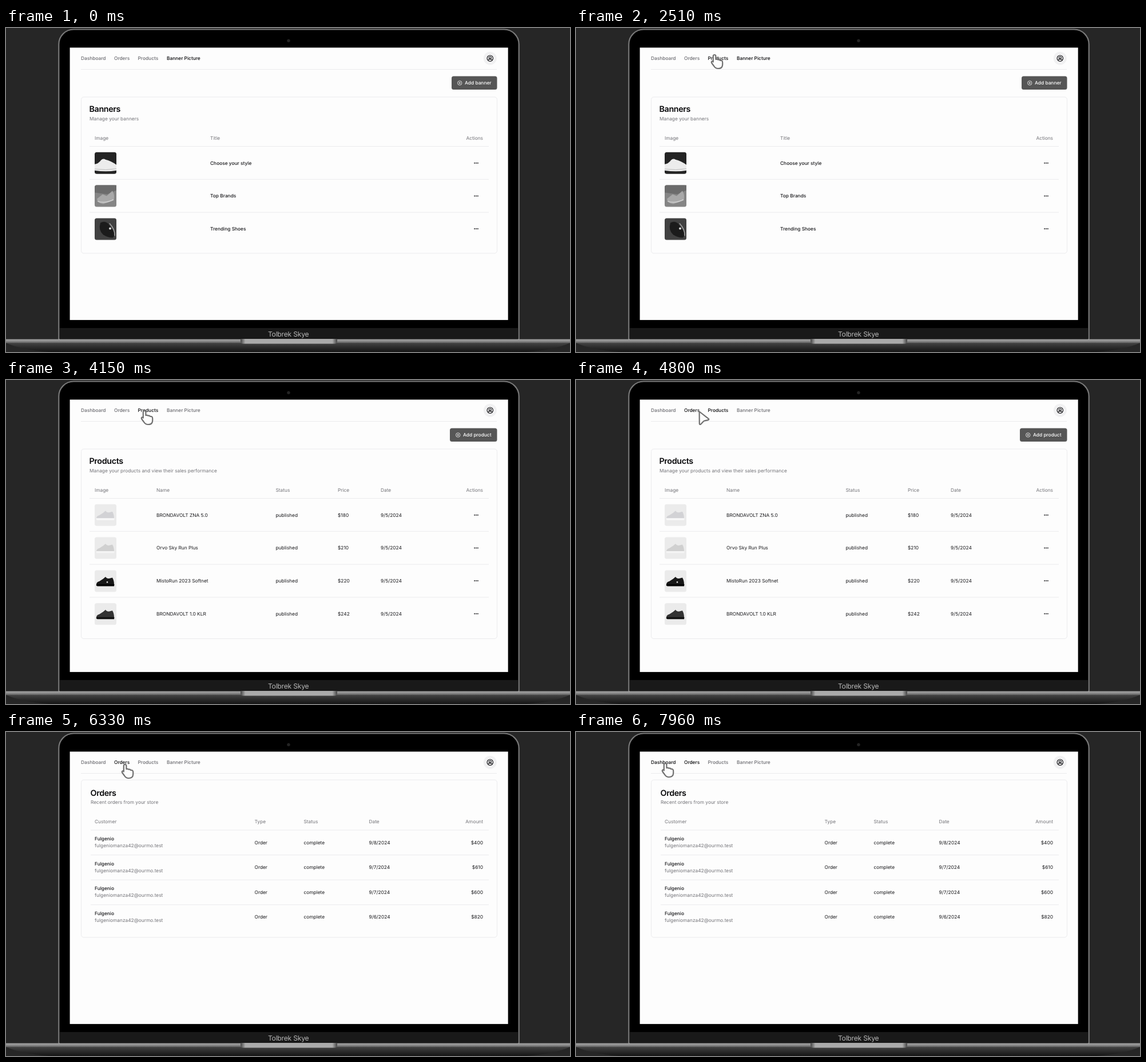
Write an HTML page that moves like this. It is 986 px wide and 568 px high and loops after 8 s.

```html
<!DOCTYPE html>
<html>
<head>
<meta charset="utf-8">
<style>
html, body { margin: 0; width: 100%; height: 100%; overflow: hidden; background: #262626; }
svg { display: block; font: 8.35px Inter, sans-serif; }
text { white-space: pre; text-rendering: geometricPrecision; fill: #18181b; }
.gray { fill: #737378; }
.medium { font-weight: 500; }
.white { fill: #fff; font-weight: 500; }
.title { font-size: 14.3px; font-weight: 600; letter-spacing: -.025em; fill: #09090b; }
.line { fill: none; stroke: #ebebed; }
</style>
</head>
<body>
<svg id="stage" width="986" height="568" viewBox="0 0 986 568"></svg>
<script>
const LOOP = 8000, STEP = 1200 / 11;
const stage = document.getElementById('stage');

const text = (x, y, s, cls = '', anchor = 'start') =>
  `<text x="${x}" y="${y}" class="${cls}" text-anchor="${anchor}">${s}</text>`;
const rect = (x, y, w, h, fill, r = 0) =>
  `<rect x="${x}" y="${y}" width="${w}" height="${h}" rx="${r}" fill="${fill}"/>`;
const circle = (x, y, r, attrs) => `<circle cx="${x}" cy="${y}" r="${r}" ${attrs}/>`;
const path = (d, attrs) => `<path d="${d}" ${attrs}/>`;
const divider = (x, y, end = 844) => path(`M${x} ${y}H${end}`, 'class="line"');
const card = (y, bottom) =>
  `<rect x="131.5" y="${y}" width="727" height="${bottom - y}" rx="4.5" class="line"/>`;
const dots = y => [819.2, 822, 824.8].map(x => circle(x, y, 1, 'fill="#18181b"')).join('');
const heading = (x, y, title, subtitle) =>
  text(x - .5, y, title, 'title') + text(x, y + 14.6, subtitle, 'gray');
const header = (y, cols, last) =>
  cols.map(([x, s]) => text(x, y, s, 'gray')).join('') + text(834, y, last, 'gray', 'end');

function addButton(x, label) {
  return rect(x, 84.5, 858.5 - x, 23.5, '#565656', 3.5) +
    circle(x + 14.2, 96.4, 3.7, 'fill="none" stroke="#fff" stroke-width=".8"') +
    path(`M${x + 12.4} 96.4h3.6m-1.8 -1.8v3.6`, 'stroke="#fff" stroke-width=".8"') +
    text(x + 23, 99.2, label, 'white');
}

const thumb = (y, bg, shapes) =>
  `<g transform="translate(155 ${y})">${rect(0, 0, 38, 38, bg, 3.5)}${shapes}</g>`;
const trainer = (upper, sole) =>
  path('M3 25Q3 20.5 8 19.5L15 15L19 11.5Q21 15 25 14.5L31 13Q34 18 34 25Z', `fill="${upper}"`) +
  path('M3 24.5H34.5L34 28H5Q2 27.5 3 24.5Z', `fill="${sole}"`);

const rowY = i => 236.7 + i * 57.7;

function bannersPage() {
  const rows = ['Choose your style', 'Top Brands', 'Trending Shoes'].map((s, i) =>
    text(357, rowY(i) + 3, s, 'medium') + dots(rowY(i)) + divider(146, 207.5 + i * 57.8));
  const whiteShoe = path('M0 21Q7 20 11 14Q15 10 19 13Q28 15 38 22V32Q20 35 0 32Z', 'fill="#ececec"') +
    path('M0 29.5Q20 32 38 29', 'fill="none" stroke="#bbb"');
  const grayShoe = path('M0 3.5Q0 0 3.5 0H38V9L22 16L0 13Z', 'fill="#6c6c6c"') +
    path('M4 24L14 16L21 19L31 10Q36 18 33 27L15 33Q5 32 4 24Z', 'fill="#a8a8a8"') +
    path('M5 28Q18 33 33 25', 'fill="none" stroke="#d2d2d2" stroke-width="1.5"');
  const darkShoe = path('M10 8Q18 4 24 10L32 21Q37 30 32 34Q25 35 15 29Q6 21 10 8Z', 'fill="#1b1b1b"') +
    path('M26 9Q36 20 35 31', 'fill="none" stroke="#a5a5a5" stroke-width="1.5"') +
    circle(27, 18, 2, 'fill="#ddd"');
  return addButton(779, 'Add banner') + card(121, 395) +
    heading(146, 147.4, 'Banners', 'Manage your banners') +
    header(196, [[155, 'Image'], [357, 'Title']], 'Actions') + rows.join('') +
    thumb(217.8, '#242424', whiteShoe) + thumb(275.6, '#858585', grayShoe) +
    thumb(333.4, '#414141', darkShoe);
}

function productsPage() {
  const items = [
    ['BRONDAVOLT ZNA 5.0', '$180', '#d2d2d5', '#f8f8f8'],
    ['Orvo Sky Run Plus', '$210', '#d0d0d0', '#f4f4f4'],
    ['MistoRun 2023 Softnet', '$220', '#171717', '#050505'],
    ['BRONDAVOLT 1.0 KLR', '$242', '#333', '#111']
  ];
  const rows = items.map(([name, price], i) => {
    const y = rowY(i) + 3;
    return text(263, y, name) + text(471.5, y, 'published') + text(580, y, price) +
      text(655, y, '9/5/2024') + dots(rowY(i)) + divider(146, 207.5 + i * 57.8);
  });
  const pictures = items.map(([, , upper, sole], i) =>
    thumb(217.8 + i * 57.8, '#ebebeb',
      trainer(upper, sole) + (i == 2 ? circle(22, 21, 1.3, 'fill="#ddd"') : '')));
  return addButton(776, 'Add product') + card(121, 453.5) +
    heading(146, 147.4, 'Products', 'Manage your products and view their sales performance') +
    header(196, [[155, 'Image'], [263, 'Name'], [471.5, 'Status'], [580, 'Price'], [655, 'Date']], 'Actions') +
    rows.join('') + `<g id="pictures">${pictures.join('')}</g>`;
}

function ordersPage() {
  const rows = [['8', 400], ['7', 610], ['7', 600], ['6', 820]].map(([day, amount], i) => {
    const y = 196.8 + i * 43.4;
    return text(155, y - 6.5, 'Fulgenio', 'medium') +
      text(155, y + 5.6, 'fulgeniomanza42@ourmo.test', 'gray') +
      text(434.5, y, 'Order') + text(520.5, y, 'complete') +
      text(634.5, y, `9/${day}/2024`) + text(834, y, '$' + amount, '', 'end') +
      divider(148, 172 + i * 43.6);
  });
  return card(84, 360) + heading(148, 111.5, 'Orders', 'Recent orders from your store') +
    header(160, [[155, 'Customer'], [434.5, 'Type'], [520.5, 'Status'], [634.5, 'Date']], 'Amount') +
    rows.join('');
}

const gradient = (id, stops, dir = 'x2="0" y2="1"') => `<linearGradient id="${id}" ${dir}>` +
  stops.map(([at, c]) => `<stop offset="${at}" stop-color="${c}"/>`).join('') + '</linearGradient>';

function laptop() {
  return '<defs>' + gradient('bar', [[0, '#a6a6a6'], [.6, '#858585'], [1, '#5d5d5d']]) +
    gradient('under', [[0, '#444'], [.5, '#2b2b2b'], [1, '#151515']]) +
    gradient('notch', [[0, '#444'], [.05, '#aaa'], [.95, '#aaa'], [1, '#444']], '') + '</defs>' +
    rect(0, 0, 986, 568, '#262626') +
    path('M92.3 546V28.5A26 26 0 0 1 118.3 2.5H870.7A26 26 0 0 1 896.7 28.5V546Z',
      'fill="#000" stroke="#787878" stroke-width="2.2"') +
    rect(94, 526, 801, 20, '#191919') +
    circle(494, 22.3, 2.7, 'fill="#242424"') +
    rect(111.6, 34.4, 766.1, 477.5, '#fdfdfd') + divider(131, 72.5, 858) +
    `<text x="493.7" y="541" text-anchor="middle" style="font-size:12.2px;letter-spacing:-.02em;fill:#b5b5b5">Tolbrek Skye</text>` +
    path('M0 552H986Q960 564 910 568H76Q26 564 0 552Z', 'fill="url(#under)"') +
    rect(0, 545.6, 986, 6.6, 'url(#bar)') +
    path('M410 545H579V549Q579 553.5 574 553.5H415Q410 553.5 410 549Z', 'fill="url(#notch)"');
}

const NAV = [[131, 'Dashboard'], [189, 'Orders'], [230.5, 'Products'], [281, 'Banner Picture']];
const OUTLINE = 'fill="#fdfdfd" stroke="#707070" stroke-width="2.2" stroke-linejoin="round"';

stage.innerHTML = laptop() +
  NAV.map(([x, s]) => text(x, 55.9, s, 'nav medium')).join('') +
  circle(846.3, 53.2, 11.5, 'fill="#f1f1f2"') +
  '<g fill="none" stroke="#18181b" stroke-width="1.2">' + circle(846.3, 53.2, 5.2, '') +
  circle(846.3, 51.9, 1.9, '') + path('M843 57v-.5q0 -1.6 1.6 -1.6h3.4q1.6 0 1.6 1.6v.5', '') + '</g>' +
  [bannersPage(), productsPage(), ordersPage()].map(p => `<g class="page">${p}</g>`).join('') +
  '<g id="cursor">' +
  path('M.8 2.4Q.8 .6 2.3 1.7L16.8 13Q18.4 14.8 16.2 15.3L10.5 16.5Q8.8 17 7.6 18.3L3.6 22.5Q1.2 24.2 1 21.5Z', `id="arrow" ${OUTLINE}`) +
  path('M-2.2 3.5Q-2.2 1 0 1Q2.4 1 2.4 3.5V9Q5 7.8 6.3 9.6Q8.8 8.9 10 10.8Q14.2 10.4 14.2 14.5V18Q14 25 6.5 25Q1.5 25 -1 20.5L-4.7 15.5Q-6 13 -4 12.3Q-2.6 12.1 -2.2 13.5Z', `id="hand" ${OUTLINE}`) +
  '</g>';

// time, x, y of the pointer's tip
const TRACK = [
  [1150, 600, 130], [1420, 541.5, 57.8], [2350, 242, 46], [2900, 242, 46], [3300, 242, 53],
  [4300, 242, 53], [4800, 214.8, 54.8], [5250, 208, 56], [7000, 208, 56], [7700, 156, 54]
];

function pointerAt(t) {
  const i = TRACK.findIndex(k => k[0] > t);
  if (i < 0) return TRACK[TRACK.length - 1].slice(1);
  if (i == 0) return TRACK[0].slice(1);
  const [a, b] = [TRACK[i - 1], TRACK[i]];
  const u = (t - a[0]) / (b[0] - a[0]), e = u * u * (3 - 2 * u);
  return [a[1] + (b[1] - a[1]) * e, a[2] + (b[2] - a[2]) * e];
}

const within = (t, a, b) => t >= a && t < b;
const show = (el, on) => el.setAttribute('visibility', on ? 'inherit' : 'hidden');
const get = id => document.getElementById(id);
const pages = [...stage.querySelectorAll('.page')];
const links = [...stage.querySelectorAll('.nav')];
const cursor = get('cursor'), arrow = get('arrow'), hand = get('hand'), pictures = get('pictures');

function draw(now) {
  const t = Math.floor((now % LOOP + 5) / STEP) * STEP;
  const page = t < 3050 ? 0 : t < 5700 ? 1 : 2;
  const hover = within(t, 2100, 4500) ? 2 : within(t, 4600, 7200) ? 1 : t > 7400 ? 0 : -1;
  const pointing = within(t, 2150, 4450) || within(t, 5000, 7200) || t > 7450;
  pages.forEach((p, i) => show(p, i == page));
  links.forEach((l, i) => l.style.fill = i == 3 - page || i == hover ? '#09090b' : '#6b6b70');
  show(pictures, t > 3900);
  show(arrow, !pointing);
  show(hand, pointing);
  cursor.setAttribute('opacity', Math.max(0, Math.min(1, (t - 1150) / 200)));
  cursor.setAttribute('transform', `translate(${pointerAt(t)})`);
}

const start = performance.now();
(function tick() {
  draw(performance.now() - start);
  requestAnimationFrame(tick);
})();
</script>
</body>
</html>
```
